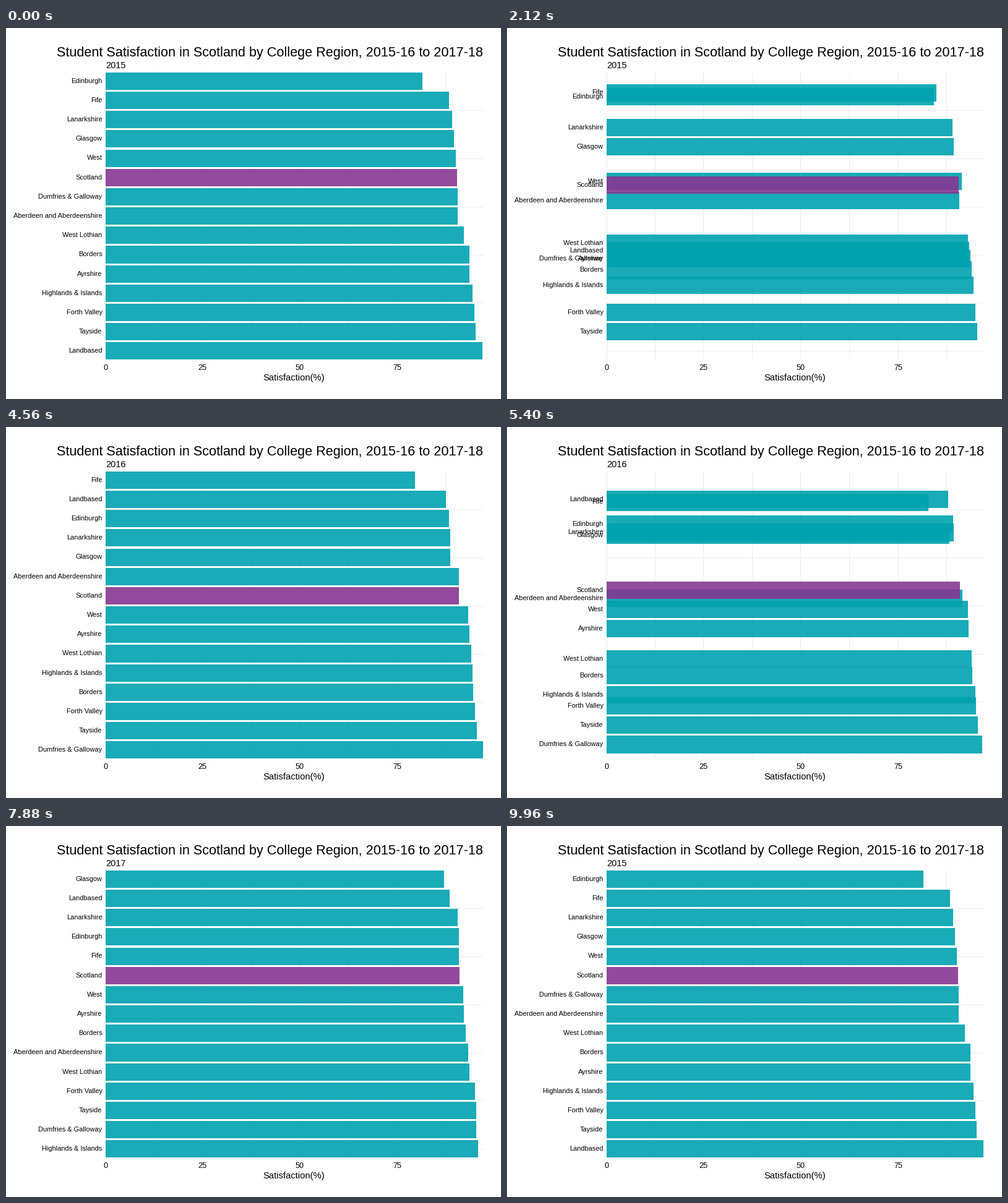
These frames come from a looping animation (800 by 600 pixels, 10000 ms). A matplotlib script:

```python
import matplotlib.pyplot as plt
from matplotlib.animation import FuncAnimation
from matplotlib.patches import Rectangle

W, H, DPI = 800, 600, 100
FRAMES, INTERVAL = 250, 40
LEFT, TOP, RIGHT, BOTTOM = 161, 72, 771, 536
X0, X_UNIT = 160.7, 6.285          # pixel of 0 % and pixels per percent
ROW_TOP, ROW_STEP, BAR_H = 71.85, 31.18, 28.06
TEAL, PURPLE, GRID = "#00A2AF", "#863691", "#EBEBEB"

# Regions in rank order for each year
RANKINGS = {
    "2015": [("Edinburgh", 81.5), ("Fife", 88.4), ("Lanarkshire", 89.1),
             ("Glasgow", 89.6), ("West", 90.1), ("Scotland", 90.4),
             ("Dumfries & Galloway", 90.6), ("Aberdeen and Aberdeenshire", 90.6),
             ("West Lothian", 92.2), ("Borders", 93.6), ("Ayrshire", 93.6),
             ("Highlands & Islands", 94.4), ("Forth Valley", 94.9),
             ("Tayside", 95.2), ("Landbased", 97.0)],
    "2016": [("Fife", 79.6), ("Landbased", 87.6), ("Edinburgh", 88.4),
             ("Lanarkshire", 88.7), ("Glasgow", 88.7),
             ("Aberdeen and Aberdeenshire", 90.9), ("Scotland", 90.9),
             ("West", 93.3), ("Ayrshire", 93.6), ("West Lothian", 94.1),
             ("Highlands & Islands", 94.4), ("Borders", 94.6),
             ("Forth Valley", 95.0), ("Tayside", 95.5),
             ("Dumfries & Galloway", 97.1)],
    "2017": [("Glasgow", 87.1), ("Landbased", 88.5), ("Lanarkshire", 90.6),
             ("Edinburgh", 90.9), ("Fife", 90.9), ("Scotland", 91.1),
             ("West", 92.0), ("Ayrshire", 92.2), ("Borders", 92.7),
             ("Aberdeen and Aberdeenshire", 93.3), ("West Lothian", 93.6),
             ("Forth Valley", 95.0), ("Tayside", 95.4),
             ("Dumfries & Galloway", 95.4), ("Highlands & Islands", 95.8)],
}
STATES = {year: {name: (row, value) for row, (name, value) in enumerate(ranking)}
          for year, ranking in RANKINGS.items()}

# Start frame, length in frames, from, to
MOVES = [(28, 53.8, "2015", "2016"),
         (113, 53, "2016", "2017"),
         (196, 53, "2017", "2015")]

plt.rcParams["font.family"] = "Liberation Sans"
fig = plt.figure(figsize=(W / DPI, H / DPI), dpi=DPI, facecolor="white")
ax = fig.add_axes([0, 0, 1, 1])
ax.set_xlim(0, W)
ax.set_ylim(H, 0)
ax.axis("off")


def box(x, y, w, h, color, **kw):
    return ax.add_patch(Rectangle((x, y), w, h, facecolor=color, linewidth=0,
                                  antialiased=False, **kw))


def label(x, y, text, px, ha):
    return ax.text(x, y, text, fontsize=px * 72 / DPI, ha=ha, va="baseline",
                   color="black", zorder=5)


for i in range(8):
    box(max(LEFT, int(X0 + 12.5 * i * X_UNIT)), TOP, 1, BOTTOM - TOP, GRID)
for i in range(6):
    box(LEFT, round(133.3 + 77.75 * i), RIGHT - LEFT, 1, GRID)

label(771, 46, "Student Satisfaction in Scotland by College Region, "
      "2015-16 to 2017-18", 21.65, "right")
label(465.5, 570, "Satisfaction(%)", 14.7, "center")
for tick in (0, 25, 50, 75):
    label(X0 + tick * X_UNIT, 553, str(tick), 12.6, "center")
subtitle = label(161, 65, "2015", 14.5, "left")

bars, names = {}, {}
for region in STATES["2015"]:
    special = region == "Scotland"
    bars[region] = box(LEFT, TOP, 1, 28, PURPLE if special else TEAL,
                       alpha=0.9, zorder=3 if special else 2)
    names[region] = label(155.5, 0, region, 11, "right")


def ease(t):
    return 4 * t ** 3 if t < 0.5 else 1 - 4 * (1 - t) ** 3


def progress(frame):
    """Return the two years being blended and the linear time between them."""
    for start, length, old, new in reversed(MOVES):
        if frame >= start:
            return old, new, min(1, (frame - start) / length)
    return "2015", "2015", 0


def update(frame):
    old, new, t = progress(frame)
    k = ease(t)
    subtitle.set_text(new if t > 0.5 else old)
    for region, bar in bars.items():
        row, value = (a + (b - a) * k for a, b in
                      zip(STATES[old][region], STATES[new][region]))
        y = ROW_TOP + ROW_STEP * row
        top, bottom = round(y), round(y + BAR_H)
        right = min(RIGHT, round(X0 + value * X_UNIT))
        bar.set_bounds(LEFT, top, right - LEFT, bottom - top)
        names[region].set_y(round(y + BAR_H / 2 + 2.85))
    return [subtitle, *bars.values(), *names.values()]


anim = FuncAnimation(fig, update, frames=FRAMES, interval=INTERVAL,
                     repeat=True, repeat_delay=0, blit=False)
plt.show()
```
